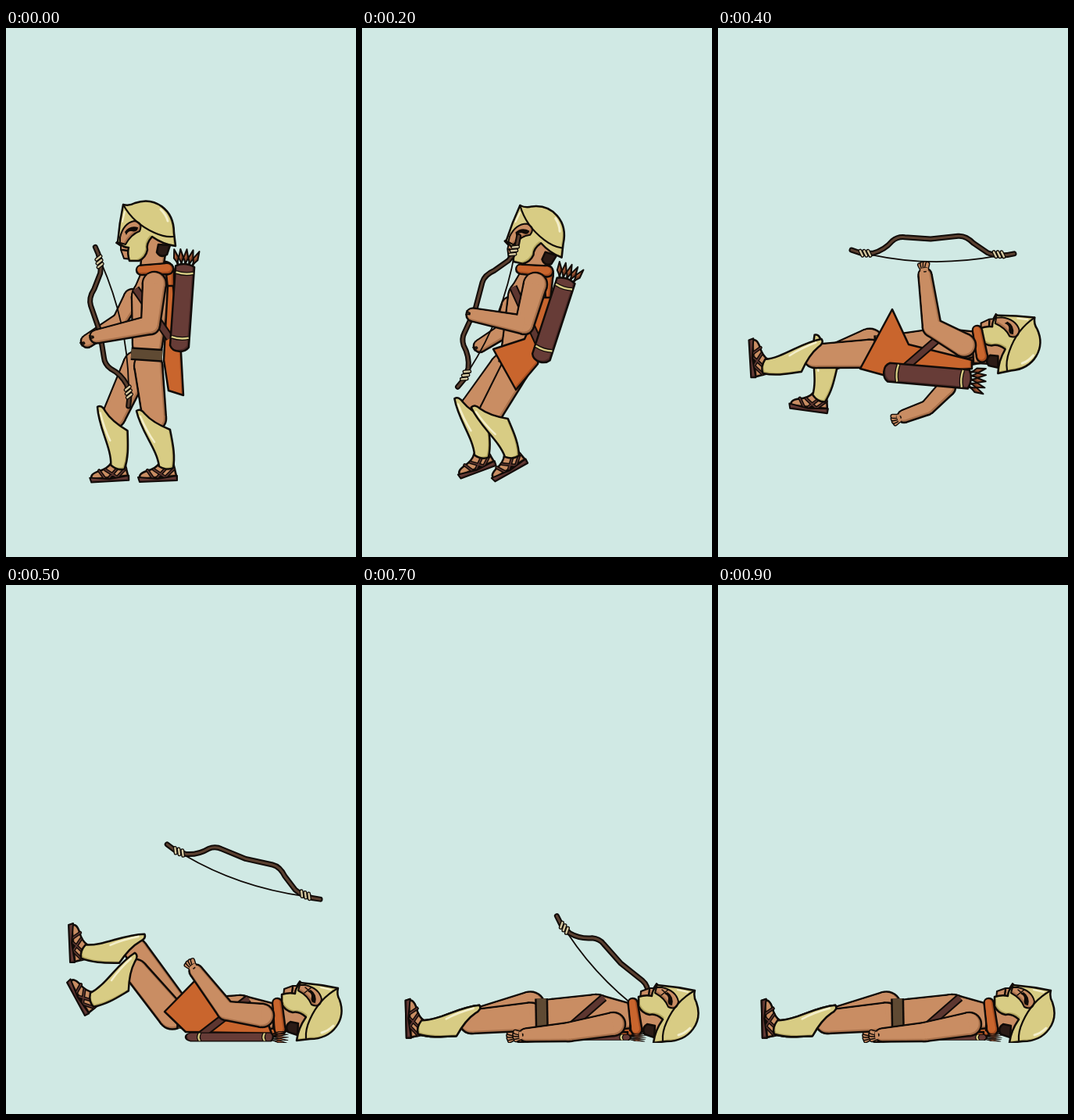
Animation of 448x677 px, one loop 1.1 s. Source, as an HTML page with a canvas:

```html
<!DOCTYPE html>
<html lang="en">
<head>
<meta charset="utf-8">
<title>Falling archer</title>
<style>
html, body { margin: 0; height: 100%; overflow: hidden; background: #d0e9e4; }
canvas { display: block; }
</style>
</head>
<body>
<canvas id="stage" width="448" height="677"></canvas>
<script>
const g = document.getElementById('stage').getContext('2d');
const SKY = '#d0e9e4', INK = '#100b08', BROWN = '#5d3630', PALE = '#f4efcb';
const SKIN = ['#c98d63', '#a9714b'], GOLD = ['#d8cc84', '#b5a75f'];
const CAPE = ['#c9652d', '#a64d20'], LEATHER = ['#673c37', '#4e2b28'];
g.lineJoin = 'round';

// Joints of the key poses. spine: hip, chest, neck; arms: shoulder, elbow, hand;
// legs: knee, ankle; placed parts: x, y, degrees.
const standing = {
  spine: [[181, 405], [185, 345], [190, 311]], head: [180, 255, 0],
  quiver: [225.5, 357, 4, 1], bow: [136, 382, -102.6],
  farArm: [[162, 345], [146, 374], [104, 401]], nearArm: [[190, 327], [185, 380], [116, 395]],
  farLeg: [[138, 497], [143, 562]], nearLeg: [[190, 500], [205, 562]],
  farFoot: -1, nearFoot: 0, farOpen: 0, nearOpen: 0,
  skirt: [[207, 330], [214, 330], [224, 415], [227, 470], [208, 464], [202, 425]]
};
const reeling = {
  spine: [[198, 410], [211, 345], [220, 312]], head: [225, 262, 13],
  quiver: [245, 373, 18, 1], bow: [162, 363, -68.8],
  farArm: [[190, 355], [178, 390], [151, 407]], nearArm: [[222, 328], [208, 380], [142, 367]],
  farLeg: [[141, 486], [153, 548]], nearLeg: [[165, 492], [192, 548]],
  farFoot: -18, nearFoot: -27, farOpen: 0, nearOpen: 0,
  skirt: [[232, 345], [243, 345], [225, 430], [197, 463], [168, 411], [208, 398]]
};
const tipping = {
  spine: [[200, 402], [224, 350], [243, 315]], head: [262, 267, 26],
  quiver: [247, 382, 33, 1], bow: [153.5, 347, -74],
  farArm: [[258, 375], [254, 410], [245, 433]], nearArm: [[240, 332], [205, 366], [133, 352]],
  farLeg: [[150, 495], [152, 540]], nearLeg: [[131, 490], [108, 551]],
  farFoot: -17, nearFoot: 36, farOpen: 1, nearOpen: 0,
  skirt: [[255, 330], [265, 330], [240, 410], [187, 461], [156, 394], [208, 390]]
};
const flying = {
  spine: [[222, 412], [285, 408], [333, 404]], head: [379, 403, 85],
  quiver: [269, 445, 95, 1], bow: [275, 287, .5],
  farArm: [[293, 460], [268, 486], [238, 497]], nearArm: [[315, 406], [274, 383], [265, 316]],
  farLeg: [[138, 425], [129, 474]], nearLeg: [[124, 420], [59, 433]],
  farFoot: 10, nearFoot: 89, farOpen: 1, nearOpen: 1,
  skirt: [[325, 425], [325, 436], [215, 445], [182, 436], [223, 360], [244, 405]]
};
const landing = {
  dead: true, spine: [[240, 548], [300, 549], [347, 552]], head: [396, 546, 90],
  quiver: [287, 578.5, 90, .45], bow: [304, 367.5, 18.9],
  farArm: [[300, 560], [280, 565], [260, 570]], nearArm: [[328, 551], [282, 545], [243, 494]],
  farLeg: [[166, 467], [99, 469]], nearLeg: [[166, 494], [110, 531]],
  farFoot: 90, nearFoot: 64, farOpen: 1, nearOpen: 1,
  skirt: [[335, 560], [340, 574], [230, 572], [203, 546], [250, 498], [268, 545]]
};
const lying = {
  dead: true, spine: [[243, 549], [300, 548], [347, 552]], head: [397, 549, 90],
  quiver: [289, 579, 90, .3], bow: [321.5, 498.5, 45],
  farArm: [[300, 568], [260, 572], [202, 577]], nearArm: [[322, 562], [265, 572], [210, 576]],
  farLeg: [[140, 559], [74, 566]], nearLeg: [[140, 559], [74, 566]],
  farFoot: 91, nearFoot: 91, farOpen: 1, nearOpen: 1,
  skirt: [[340, 572], [340, 576], [250, 577], [250, 576], [250, 574], [270, 573]]
};

function halfway(a, b) {
  if (typeof a === 'number') return (a + b) / 2;
  if (Array.isArray(a)) return a.map((v, i) => halfway(v, b[i]));
  if (typeof a !== 'object') return a;
  return Object.fromEntries(Object.keys(a).map(k => [k, halfway(a[k], b[k])]));
}

const sinking = { ...lying, bow: [336, 546, 45] }, still = { ...lying, bow: null };
const steps = [
  standing, halfway(standing, reeling), reeling, tipping, flying, landing,
  halfway(landing, lying), lying, sinking, still, still
];

function line(d, width = 2.2, color = INK, cap = 'round') {
  g.lineCap = cap;
  g.lineWidth = width;
  g.strokeStyle = color;
  g.stroke(new Path2D(d));
}

function edged(d, outer, inner, color, cap) {
  line(d, outer, INK, cap);
  line(d, inner, color, cap);
}

function shape(d, [fill, shade], width = 2.5) {
  const path = new Path2D(d);
  g.save();
  g.clip(path);
  g.fillStyle = shade;
  g.fill(path);
  g.translate(-2.5, -2);
  g.fillStyle = fill;
  g.fill(path);
  g.restore();
  line(path, width);
}

// A chain of tapered capsules with one common outline.
function limb(points, radii, [fill, shade]) {
  const pass = (color, grow, shift) => {
    g.fillStyle = color;
    points.forEach(([x, y], i) => {
      const r = radii[i] + grow;
      g.beginPath();
      g.arc(x + shift, y + shift, r, 0, 7);
      g.fill();
      if (!i) return;
      const [px, py] = points[i - 1], pr = radii[i - 1] + grow;
      const d = Math.hypot(x - px, y - py), nx = (py - y) / d, ny = (x - px) / d;
      g.beginPath();
      for (const [cx, cy, k] of [[px, py, pr], [x, y, r], [x, y, -r], [px, py, -pr]])
        g.lineTo(cx + nx * k + shift, cy + ny * k + shift);
      g.fill();
    });
  };
  pass(INK, 1.3, 0);
  pass(shade, -1.2, 0);
  pass(fill, -2.2, -1);
}

function place([x, y, degrees, squash = 1], draw, px = 0, py = 0) {
  g.save();
  g.translate(x, y);
  g.rotate(degrees * Math.PI / 180);
  g.scale(squash, 1);
  g.translate(-px, -py);
  draw();
  g.restore();
}

function foot() {
  shape('M197 556L214 556L218 573L172 577Q168 571 180 567Q192 564 197 556Z', SKIN);
  edged('M181 566L188 576M189 565L204 575L215 564M194 575L206 562', 4.4, 1.6, BROWN);
  shape('M169 575L194 577L219 573L219 579L171 581Z', LEATHER, 2);
}

function shin() {
  shape('M167 490C173 517 193 538 196 561Q206 567 214 563C217 546 213 530 210 514C195 508 185 502 178 494Q172 486 167 490Z', GOLD);
  line('M172 497Q180 516 190 530', 2.5, PALE);
}

function leg(hip, [knee, ankle], footAngle) {
  const lean = Math.atan2(knee[1] - ankle[1], knee[0] - ankle[0]) * 180 / Math.PI;
  place([...ankle, footAngle], foot, 205, 562);
  limb([hip, knee], [18, 15], SKIN);
  place([...ankle, lean + 103.6], shin, 205, 562);
}

function arm(points, radii, open) {
  const [, [ex, ey], [hx, hy]] = points;
  const turn = Math.atan2(hy - ey, hx - ex) * 180 / Math.PI;
  const finger = (i, from, to) => `M${from} ${i * from * .25}L${to} ${i * to * .25}`;
  const fan = [-1.5, -.5, .5, 1.5];
  place([hx, hy, turn], () => {
    if (open > .4) for (const i of fan) edged(finger(i, 4, 15 - Math.abs(i)), 6.4, 3.6, SKIN[0]);
  });
  limb(points, radii, SKIN);
  place([hx, hy, turn], () => {
    for (const i of fan.slice(1)) line(finger(i, 4, 9), 1.4);
    if (open > .4) line('M7 -3V3', 4, SKIN[0]);
  });
}

function head(dead) {
  shape('M174 284L172 308L201 309L206 276L187 264Z', SKIN);
  shape('M195 277L193 287Q198 295 206 290L210 278Z', ['#2b1b16', '#2b1b16']);
  shape('M148 268L141 275L147 279L147 284L151 295L161 296V270Z', SKIN, 2);
  shape('M150 226Q158 228 165 224C190 215 215 232 215 262L217 279Q201 277 187 267Q179 276 181 284Q179 294 170 298L158 298Q155 288 157 281Q150 281 143 274Q145 250 150 226Z', GOLD);
  shape('M146 268Q150 250 164 247Q176 249 171 260Q160 264 153 277L146 275Z', SKIN, 2);
  g.fillStyle = INK;
  g.fill(new Path2D('M152 261Q158 252 169 255Q169 262 160 260Q156 260 154 265Z'));
  if (dead) line('M149 260L156 269M156 260L149 268', 1.5);
  line('M150 226Q163 250 190 262Q203 268 214 267');
  line('M149 284L156 285', 2.5);
  line('M198 232Q205 239 207 247', 3, PALE);
  line('M152 235L149 248', 2, PALE);
}

function quiver() {
  for (let i = -2; i <= 2; i++) {
    place([i * 4, -50, i * 10 + 2], () => {
      line('M0 0V-16', 3);
      shape('M0 -6L-3 -13L0 -24L3 -13Z', ['#a65f3b', '#7d4127'], 2);
    });
  }
  shape('M-12 -52Q0 -58 12 -52L12 51Q8 57 0 57Q-9 57 -12 50Z', LEATHER);
  for (const y of [-44, 39]) edged(`M-11 ${y}Q0 ${y + 3} 11 ${y}`, 5, 2.4, GOLD[0], 'butt');
}

function bow() {
  line('M-78 4Q0 20 83 4', 1.8);
  edged('M-104 -2L-92 2L-77 2Q-62 -2 -52 -14Q-45 -20 -36 -19L-3 -17L32 -21Q42 -22 52 -12L70 0Q84 6 104 1', 7, 3, '#5b4030');
  for (const x of [-93, -88, -83, 78, 83, 88]) edged(`M${x} -1l3 6`, 5, 2.4, '#d5c9a0');
}

function drawPose(p) {
  const [hip, chest, neck] = p.spine;
  const d = Math.hypot(hip[0] - chest[0], hip[1] - chest[1]);
  const ax = (hip[0] - chest[0]) / d, ay = (hip[1] - chest[1]) / d;
  // A point measured from a joint: down the spine, then towards the back.
  const off = ([x, y], down, back) => [x + ax * down + ay * back, y + ay * down - ax * back];
  const band = (a, b) => `M${a}L${b}`;

  if (p.bow && p.dead) place(p.bow, bow);
  arm(p.farArm, [11, 9, 8], p.farOpen);
  limb([off(neck, 0, 12), off(chest, 10, 17)], [13, 14], CAPE);
  leg(off(hip, 27, -11), p.farLeg, p.farFoot);
  limb([hip, chest, neck], [19, 24, 15], SKIN);
  leg(off(hip, 27, 3), p.nearLeg, p.nearFoot);
  edged(band(off(hip, 13, -20), off(hip, 13, 20)), 17, 12, '#5f4a33', 'butt');
  shape(`M${p.skirt.join('L')}Z`, CAPE);
  edged(band(off(chest, -10, -20), off(hip, -10, 28)), 11, 7, BROWN, 'butt');
  place(p.head, () => head(p.dead), 180, 255);
  limb([off(neck, 0, -17), off(neck, -4, 17)], [6, 7], CAPE);
  place(p.quiver, quiver);
  if (p.bow && !p.dead) place(p.bow, bow);
  arm(p.nearArm, [15, 12, 8.5], p.nearOpen);
}

function frame(now) {
  g.fillStyle = SKY;
  g.fillRect(0, 0, 448, 677);
  g.save();
  g.beginPath();
  g.rect(0, 0, 448, 586);
  g.clip();
  drawPose(steps[Math.floor(now % 1100 / 100)]);
  g.restore();
  requestAnimationFrame(frame);
}
frame(performance.now());
</script>
</body>
</html>
```
